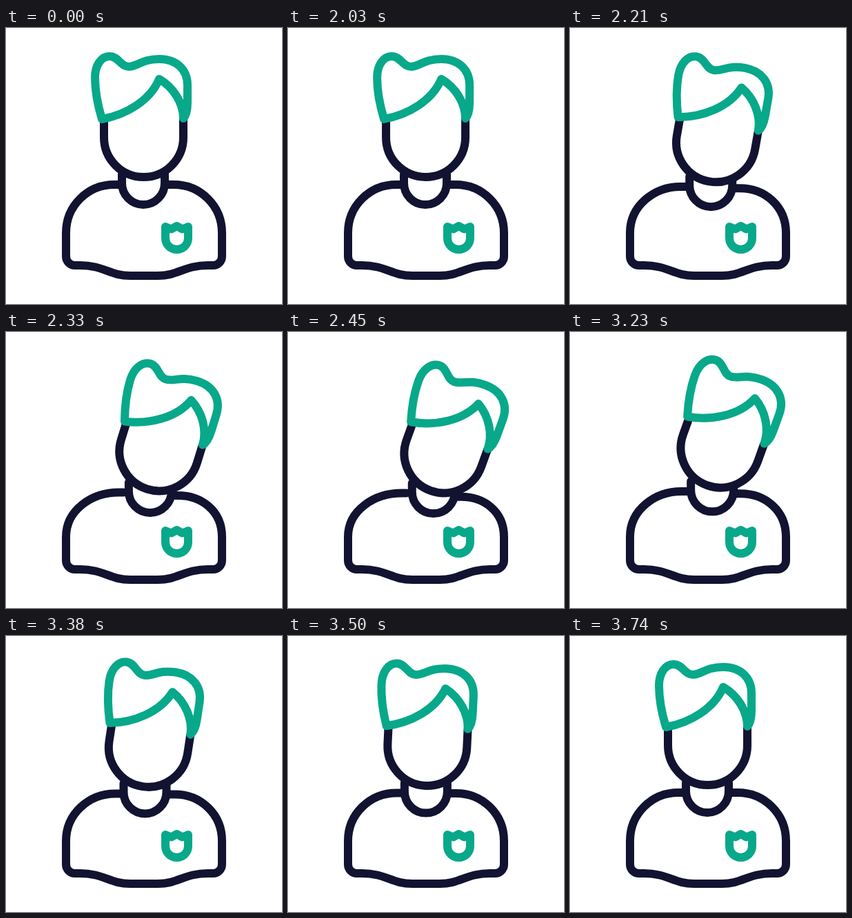
Write an HTML page that moves like this. It is 400x400 px and loops after 3.77 s.

```html
<!DOCTYPE html>
<html lang="en">
<head>
<meta charset="utf-8">
<title>Tilting head icon</title>
<style>
  html, body { margin: 0; width: 100%; height: 100%; overflow: hidden; background: #fff; }
  svg { display: block; width: 100%; height: 100%; }
  path { fill: none; stroke: #121331; stroke-width: 12; stroke-linecap: round; stroke-linejoin: round; }
  .green { stroke: #08a88a; }
  .face { fill: #fff; }
</style>
</head>
<body>
<svg viewBox="0 0 400 400">
  <path id="body"/>
  <path class="green" d="M231 288V304.5A16.5 16.5 0 0 0 264 304.5V288L255.5 291.5L247.5 287L239.5 291.5Z"/>
  <path id="neck" d="M168 212V225C168 242 182 256 199 256S230 242 230 225V212"/>
  <g id="head">
    <path class="face" d="M142 132V158.5A57.5 57.5 0 0 0 257 158.5V132"/>
    <path class="green" d="M139 132C133 112 129 92 129 72C129 54 138 41 150 41C163 41 166 56 178 56C190 56 197 45 222 45C247 45 263 60 263 83V108C263 119 261 127 257 131C257 109 243 86 222 74C209 105 174 126 139 132Z"/>
  </g>
</svg>
<script>
const LOOP = 3770;
const [body, neck, head] = ['body', 'neck', 'head'].map(id => document.getElementById(id));

// cubic-bezier(.4, 0, .2, 1)
function ease(x) {
  if (x <= 0) return 0;
  if (x >= 1) return 1;
  let lo = 0, hi = 1, s;
  for (let i = 0; i < 24; i++) {
    s = (lo + hi) / 2;
    const at = 1.2 * s * (1 - s) ** 2 + 0.6 * s * s * (1 - s) + s ** 3;
    if (at < x) lo = s; else hi = s;
  }
  return s * s * (3 - 2 * s);
}

const between = (t, from, to) => ease((t - from) / (to - from));

function bodyPath(k) {
  const dx = 8 * k, left = 227 + 7 * k, right = 227 + 12.5 * k;
  return `M${164 + dx} ${left}H${157 + dx}C${118 + dx} ${left} 87 258 87 297` +
    'V331A13 13 0 0 0 100 344H107C142 344 150 359 180 359H220C250 359 258 344 293 344H300A13 13 0 0 0 313 331V297' +
    `C313 258 282 ${right} ${243 + dx} ${right}H${235 + dx}`;
}

function draw() {
  const t = performance.now() % LOOP;
  const shift = between(t, 2015, 2630) - between(t, 2990, 3740);
  const turn = between(t, 2008, 2600) - between(t, 3155, 3740); // the tilt returns after the shift
  body.setAttribute('d', bodyPath(shift));
  neck.setAttribute('transform', `translate(${12.5 * shift} ${7.5 * shift})`);
  head.setAttribute('transform',
    `translate(${21.5 * shift} ${21 * shift}) rotate(${20.8 * turn} 209.7 175)`);
  requestAnimationFrame(draw);
}
draw();
</script>
</body>
</html>
```
